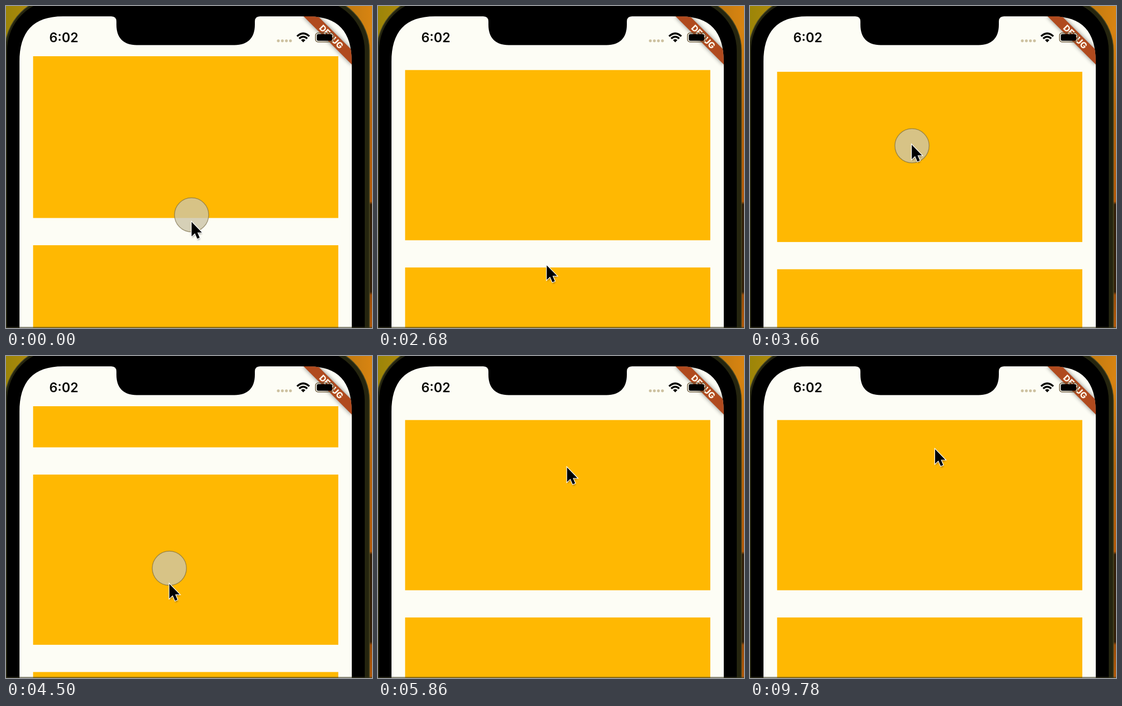
Recreate the animation shown at these times as an HTML page. Size 706x622 px, loop 9.88 s.

```html
<!DOCTYPE html>
<html lang="en">
<head>
<meta charset="utf-8">
<title>Scrolling cards</title>
<style>
  html, body { margin: 0; width: 100%; height: 100%; overflow: hidden; background: #000; }
  svg { display: block; width: 706px; height: 622px; }
  text { font-family: Inter, "Liberation Sans", sans-serif; }
</style>
</head>
<body>
<svg viewBox="0 0 706 622">
  <defs>
    <linearGradient id="wall" x1="0" y1="0" x2="1" y2="0">
      <stop offset="0" stop-color="#9c8508"/>
      <stop offset=".07" stop-color="#b08a0c"/>
      <stop offset=".93" stop-color="#c27a10"/>
      <stop offset="1" stop-color="#d88411"/>
    </linearGradient>
    <linearGradient id="side" x1="0" y1="0" x2="0" y2="1">
      <stop offset="0" stop-color="#d88411"/>
      <stop offset=".3" stop-color="#b8660c"/>
      <stop offset=".58" stop-color="#b35a0a"/>
      <stop offset=".59" stop-color="#33200a"/>
      <stop offset=".88" stop-color="#33200a"/>
      <stop offset=".89" stop-color="#9a4d0a"/>
      <stop offset="1" stop-color="#b35a0a"/>
    </linearGradient>
    <clipPath id="screen">
      <path id="glass" d="M26 622V108C26 50 52 20 110 20H203Q213 20 213 30V36C213 62 227 75.500 252 75.500H441C466 75.500 480 62 480 36V30Q480 20 490 20H583C641 20 667 50 667 108V622Z"/>
    </clipPath>
    <clipPath id="view"><rect x="26" y="97" width="641" height="525"/></clipPath>
    <filter id="soft" x="-20%" y="-80%" width="140%" height="260%"><feGaussianBlur stdDeviation="4.500"/></filter>
    <filter id="drop" x="-50%" y="-50%" width="200%" height="200%"><feGaussianBlur stdDeviation="1.500"/></filter>
  </defs>

  <rect width="706" height="622" fill="url(#wall)"/>
  <rect x="699" y="40" width="7" height="582" fill="url(#side)"/>
  <rect x="-2" y="-18" width="703" height="760" rx="104" fill="#25250f" stroke="#4b4a24" stroke-width="1.500"/>
  <rect x="2" y="-12" width="690" height="750" rx="98" fill="#000"/>
  <use href="#glass" fill="#fdfdf5"/>

  <g clip-path="url(#screen)">
    <g clip-path="url(#view)"><g id="cards" fill="#ffb802"></g></g>
    <g transform="translate(667 20) rotate(45)">
      <rect x="-66" y="46" width="132" height="19.700" fill="#000" opacity=".5" filter="url(#soft)"/>
      <rect x="-66" y="46" width="132" height="19.700" fill="#b04a1e"/>
      <text x="0" y="61.800" text-anchor="middle" font-size="16.500" font-weight="800" fill="#fff8ea">DEBUG</text>
    </g>
  </g>

  <text x="83.500" y="70" font-size="25" font-weight="600" fill="#0a0a05">6:02</text>
  <g fill="#cdc1a0">
    <circle cx="525.300" cy="67.300" r="2.700"/><circle cx="533.100" cy="67.300" r="2.700"/>
    <circle cx="540.900" cy="67.300" r="2.700"/><circle cx="548.700" cy="67.300" r="2.700"/>
  </g>
  <g fill="none" stroke="#0a0a05" stroke-width="3.700">
    <path d="M561.500 58.500Q573.300 47.500 585.100 58.500"/>
    <path d="M565.600 63Q573.300 55.800 581 63"/>
    <path d="M569 65.800Q573.300 62.200 577.600 65.800L573.300 70.200Z" fill="#0a0a05" stroke="none"/>
  </g>
  <rect x="597" y="52" width="34.500" height="17.500" rx="5" fill="none" stroke="#6b5a3c" stroke-width="1.500"/>
  <rect x="599.500" y="54.300" width="29.700" height="13" rx="3" fill="#000"/>
  <path d="M633 58q2.400 2.700 0 5.600z" fill="#6b5a3c"/>
  <rect x="0" y="620" width="706" height="1.500" fill="#3c3a24" opacity=".85"/>

  <circle id="touch" r="33" fill="#cdc6a8" fill-opacity=".8" stroke="#776b45" stroke-opacity=".65" stroke-width="1.500"/>
  <g id="cursor">
    <path id="arrow" d="M0 1V29L6.400 23L11 33.500L15.600 31.500L11.200 21.400H19.800Z" fill="#000" opacity=".35" transform="translate(1 3)" filter="url(#drop)"/>
    <path d="M0 1V29L6.400 23L11 33.500L15.600 31.500L11.200 21.400H19.800Z" fill="#000" stroke="#fff" stroke-width="2.400" paint-order="stroke"/>
  </g>
</svg>
<script>
const LOOP = 9880, TOP = 123.700, CARD = 328.800, PITCH = 381.400;
const $ = id => document.getElementById(id);

// Tracks: [time, value...]
const scroll = [[0, 43], [280, 0], [2750, 0], [3220, 287.500], [3480, 374], [3620, 378], [3800, 378],
  [4780, 208], [5150, 60], [5500, 0]];
const pointer = [[0, 358, 416], [340, 360, 490], [900, 364, 330], [1400, 367, 207], [1660, 367, 246],
  [2100, 364, 440], [2700, 325, 500], [3220, 318, 310], [3420, 313, 262], [3660, 312, 267],
  [4780, 317, 497], [5050, 321, 530], [6160, 374, 140], [7160, 378, 125], [7960, 375, 95],
  [8700, 370, 130], [9300, 359, 176], [9780, 357, 179]];
const finger = [[0, 358, 403.500], [380, 360, 480], [1400, 367, 205], [1660, 367, 237], [2100, 364, 428],
  [2700, 325, 497], [3220, 321, 331.500], [3420, 313, 268], [3660, 312.500, 270],
  [4780, 316.700, 469.500], [5050, 321, 522]];
const presses = [[0, 420], [1480, 2100], [2720, 3360], [3540, 5050]];

function at(track, t) {
  const i = track.findIndex(k => k[0] > t);
  if (i < 0) return track[track.length - 1].slice(1);
  const a = track[i - 1], b = track[i], p = (t - a[0]) / (b[0] - a[0]);
  const slope = (j, c) => {
    const l = track[j - 1], m = track[j], r = track[j + 1];
    if (!l || !r) return 0;
    const u = (m[c] - l[c]) / (m[0] - l[0]), v = (r[c] - m[c]) / (r[0] - m[0]);
    return u * v > 0 ? 2 * u * v / (u + v) : 0;
  };
  return a.slice(1).map((y, n) => {
    const c = n + 1, h = b[0] - a[0], q = 1 - p;
    return y * q * q * (1 + 2 * p) + b[c] * p * p * (3 - 2 * p)
      + h * p * q * (q * slope(i - 1, c) - p * slope(i, c));
  });
}

for (let i = 0; i < 4; i++) {
  const r = document.createElementNS("http://www.w3.org/2000/svg", "rect");
  const box = { x: 52.300, y: TOP + i * PITCH, width: 588.700, height: CARD };
  for (const k in box) r.setAttribute(k, box[k]);
  $("cards").append(r);
}

const move = (id, x, y) => $(id).setAttribute("transform", `translate(${x} ${y})`);

function draw(now) {
  const t = now % LOOP;
  move("cards", 0, -at(scroll, t)[0]);
  move("cursor", ...at(pointer, t));
  move("touch", ...at(finger, t));
  $("touch").style.display = presses.some(([a, b]) => t >= a && t < b) ? "" : "none";
}

function tick() {
  draw(performance.now());
  requestAnimationFrame(tick);
}
draw(0);
requestAnimationFrame(tick);
</script>
</body>
</html>
```
